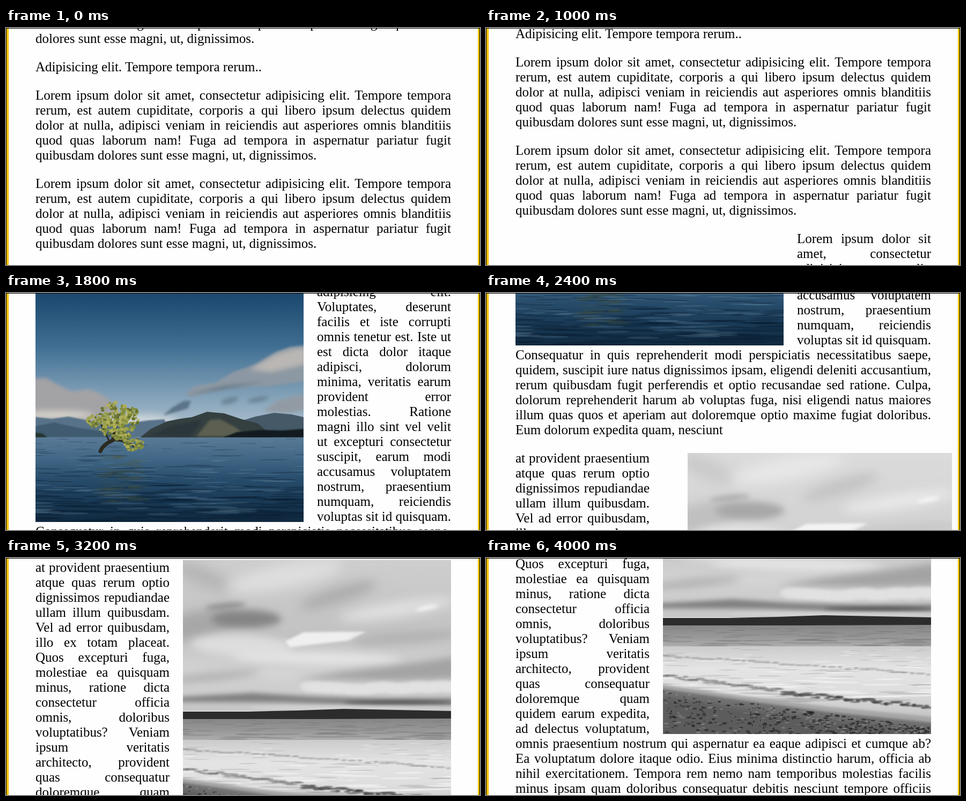
Recreate the animation shown at these times as an HTML page with a canvas. Size 884 px wide and 443 px high, loop 5700 ms.

```html
<!DOCTYPE html>
<html lang="la">
<head>
<meta charset="utf-8">
<title>Slide in on scroll</title>
<style>
  html, body { margin: 0; width: 100%; height: 100%; overflow: hidden; background: #fefefe; }
  #stage { position: relative; width: 884px; height: 443px; overflow: hidden; background: #fefefe; }
  #sides { position: absolute; inset: 0 -1px 0 0; border: solid #ffc400; border-width: 0 5px; box-sizing: border-box; }
  #page { position: absolute; left: 0; top: 0; width: 100%; height: 1800px; will-change: transform;
          font: 25px "Liberation Serif", "Times New Roman", Times, serif; color: #000; }
  #page > * { position: absolute; }
  .line { height: 28px; text-align: justify; text-align-last: justify; }
  .end { text-align-last: left; }
  canvas { width: 500px; height: 500px; }
  #frame { position: absolute; inset: 0; border: solid #000; border-width: 1px 1px 0; }
</style>
</head>
<body>
<div id="stage">
  <div id="sides"></div>
  <div id="page"></div>
  <div id="frame"></div>
</div>
<script>
const LOOP = 5700, STEP = 100;
const page = document.getElementById('page');

const lorem = `Lorem ipsum dolor sit amet, consectetur adipisicing elit. Tempore tempora
rerum, est autem cupiditate, corporis a qui libero ipsum delectus quidem
dolor at nulla, adipisci veniam in reiciendis aut asperiores omnis blanditiis
quod quas laborum nam! Fuga ad tempora in aspernatur pariatur fugit
quibusdam dolores sunt esse magni, ut, dignissimos.`;

// top, left, width, last line ragged, text
const blocks = [
  [-22, 55, 775, true, `laborum nam! Fuga ad tempora in aspernatur pariatur fugit quibusdam
dolores sunt esse magni, ut, dignissimos.`],
  [59, 55, 775, true, 'Adipisicing elit. Tempore tempora rerum..'],
  [112, 55, 775, true, lorem],
  [277, 55, 775, true, lorem],
  [442, 580, 250, false, `Lorem ipsum dolor sit
amet, consectetur
adipisicing elit.
Voluptates, deserunt
facilis et iste corrupti
omnis tenetur est. Iste ut
est dicta dolor itaque
adipisci, dolorum
minima, veritatis earum
provident error
molestias. Ratione
magni illo sint vel velit
ut excepturi consectetur
suscipit, earum modi
accusamus voluptatem
nostrum, praesentium
numquam, reiciendis
voluptas sit id quisquam.`],
  [946, 55, 775, true, `Consequatur in quis reprehenderit modi perspiciatis necessitatibus saepe,
quidem, suscipit iure natus dignissimos ipsam, eligendi deleniti accusantium,
rerum quibusdam fugit perferendis et optio recusandae sed ratione. Culpa,
dolorum reprehenderit harum ab voluptas fuga, nisi eligendi natus maiores
illum quas quos et aperiam aut doloremque optio maxime fugiat doloribus.
Eum dolorum expedita quam, nesciunt`],
  [1139, 55, 250, false, `at provident praesentium
atque quas rerum optio
dignissimos repudiandae
ullam illum quibusdam.
Vel ad error quibusdam,
illo ex totam placeat.
Quos excepturi fuga,
molestiae ea quisquam
minus, ratione dicta
consectetur officia
omnis, doloribus
voluptatibus? Veniam
ipsum veritatis
architecto, provident
quas consequatur
doloremque quam
quidem earum expedita,
ad delectus voluptatum,`],
  [1643, 55, 775, false, `omnis praesentium nostrum qui aspernatur ea eaque adipisci et cumque ab?
Ea voluptatum dolore itaque odio. Eius minima distinctio harum, officia ab
nihil exercitationem. Tempora rem nemo nam temporibus molestias facilis
minus ipsam quam doloribus consequatur debitis nesciunt tempore officiis`]
];

function place(el, left, top) {
  el.style.left = left + 'px';
  el.style.top = top + 'px';
  page.append(el);
  return el;
}

for (const [top, left, width, ragged, text] of blocks) {
  const box = place(document.createElement('div'), left, top);
  box.style.width = width + 'px';
  for (const words of text.split('\n')) {
    const line = document.createElement('div');
    line.className = 'line';
    line.textContent = words;
    box.append(line);
  }
  if (ragged) box.lastChild.classList.add('end');
}

// Drawing helpers
let seed = 7;
const rnd = (a, b) => {
  seed = (seed * 16807) % 2147483647;
  return a + (b - a) * seed / 2147483647;
};

function fade(c, y0, y1, ...colors) {
  const g = c.createLinearGradient(0, y0, 0, y1);
  colors.forEach((col, i) => g.addColorStop(i / (colors.length - 1), col));
  c.fillStyle = g;
  c.fillRect(0, y0, 500, y1 - y0);
}

function poly(c, color, blur, ...pts) {
  c.filter = blur ? `blur(${blur}px)` : 'none';
  c.fillStyle = color;
  c.beginPath();
  for (let i = 0; i < pts.length; i += 2) c.lineTo(pts[i], pts[i + 1]);
  c.fill();
  c.filter = 'none';
}

function puff(c, color, blur, x, y, rx, ry, turn = 0) {
  c.filter = blur ? `blur(${blur}px)` : 'none';
  c.fillStyle = color;
  c.beginPath();
  c.ellipse(x, y, rx, ry, turn, 0, 7);
  c.fill();
  c.filter = 'none';
}

// Flat ripples, larger towards the bottom
function ripples(c, n, y0, y1, color, len) {
  for (let i = 0; i < n; i++) {
    const k = rnd(0, 1);
    puff(c, color, 0, rnd(-20, 520), y0 + k * (y1 - y0), len * (0.3 + k) * rnd(0.5, 1), 0.5 + k * 1.6, rnd(-0.03, 0.03));
  }
}

function lake(c) {
  fade(c, 0, 342, '#173a5a', '#1f4c72', '#3f6e92', '#7d9db5', '#b9c9d3');
  poly(c, '#a3a2a5', 3, -8, 232, 20, 231, 42, 244, 68, 256, 100, 252, 125, 262, 150, 284, 165, 312, -8, 316);
  puff(c, '#d5d1cb', 6, 40, 300, 70, 8);
  puff(c, '#cfd6da', 7, 195, 312, 70, 12);
  poly(c, '#8c98a3', 2, 280, 262, 296, 246, 335, 240, 368, 220, 412, 205, 450, 182, 475, 173, 505, 170, 505, 236, 440, 246, 360, 250, 290, 266);
  poly(c, '#b9b6b3', 4, 400, 215, 445, 188, 480, 177, 505, 175, 505, 205, 440, 220);
  poly(c, '#647987', 3, 284, 262, 350, 246, 430, 238, 350, 252);
  poly(c, '#5c7487', 2, 238, 301, 255, 286, 276, 274, 290, 273, 284, 288);
  poly(c, '#929ba3', 3, 425, 293, 450, 274, 478, 266, 505, 262, 505, 290, 470, 296);
  puff(c, '#6d8799', 3, 362, 273, 17, 6, -0.3);
  puff(c, '#6d8799', 3, 415, 271, 20, 5, -0.2);

  poly(c, '#587389', 1, 0, 304, 30, 307, 62, 303, 92, 309, 120, 317, 170, 316, 210, 310, 240, 308, 260, 342, 0, 342);
  poly(c, '#405b70', 1, 0, 321, 35, 314, 80, 324, 120, 330, 150, 337, 190, 342, 0, 342);
  poly(c, '#465967', 0, 380, 312, 410, 303, 445, 296, 478, 299, 500, 304, 500, 342, 380, 342);
  poly(c, '#343f40', 0, 195, 342, 215, 326, 245, 312, 270, 307, 292, 304, 320, 294, 352, 297, 385, 308, 415, 316, 445, 342);
  poly(c, '#5d6050', 2, 300, 340, 325, 309, 345, 308, 375, 324, 392, 340);
  poly(c, '#2b363b', 2, 215, 338, 255, 320, 310, 310, 288, 340);
  poly(c, '#111b20', 1, 350, 342, 376, 332, 420, 328, 460, 329, 500, 326, 500, 342);
  poly(c, '#25352e', 1, 0, 342, 0, 333, 14, 335, 22, 342);

  fade(c, 342, 500, '#597a96', '#416786', '#274c6b', '#193955', '#102a40');
  ripples(c, 150, 345, 500, 'rgba(8,27,46,.32)', 55);
  ripples(c, 100, 345, 488, 'rgba(120,155,182,.2)', 38);

  for (let i = 0; i < 46; i++) {
    const y = rnd(373, 462);
    puff(c, 'rgba(82,88,52,.24)', 1, rnd(125, 195), y, rnd(8, 25), 1.8);
  }
  c.strokeStyle = '#2c2a20';
  c.lineCap = 'round';
  for (const [w, ...p] of [
    [7, 121, 368, 126, 355, 143, 348],
    [5, 143, 348, 150, 325, 154, 300],
    [4, 143, 347, 170, 346, 188, 362],
    [3, 138, 349, 127, 330, 120, 310]
  ]) {
    c.lineWidth = w;
    c.beginPath();
    c.moveTo(p[0], p[1]);
    c.quadraticCurveTo(p[2], p[3], p[4], p[5]);
    c.stroke();
  }
  const leaves = ['#66712f', '#838d3c', '#9da24b', '#b0ae59'];
  for (const [x, y, rx, ry] of [[146, 298, 29, 22], [170, 312, 22, 19], [118, 312, 21, 13], [145, 324, 25, 16], [182, 293, 11, 9], [184, 355, 18, 11], [162, 340, 15, 9]]) {
    for (let i = 0; i < rx * 2.6; i++) {
      const a = rnd(0, 6.28), r = Math.sqrt(rnd(0, 1));
      puff(c, leaves[Math.floor(rnd(0, 4))], 0, x + Math.cos(a) * r * rx, y + Math.sin(a) * r * ry, rnd(1.5, 4), rnd(1.5, 3.5));
    }
  }
}

function shore(c) {
  fade(c, 0, 282, '#cecece', '#c8c8c8', '#c2c2c2', '#d4d4d4', '#c6c6c6');
  puff(c, '#b5b5b5', 12, 35, 30, 60, 18, 0.4);
  puff(c, '#dedede', 12, 190, 30, 110, 22, -0.2);
  puff(c, '#acacac', 10, 290, 65, 75, 14, -0.3);
  puff(c, '#a7a7a7', 10, 30, 120, 75, 25, -0.2);
  puff(c, '#858585', 7, 118, 110, 65, 17);
  puff(c, '#929292', 5, 80, 86, 38, 6, -0.1);
  puff(c, '#e0e0e0', 10, 400, 92, 110, 14, -0.15);
  puff(c, '#f2f2f2', 3, 455, 89, 22, 4, -0.2);
  puff(c, '#dddddd', 8, 110, 160, 95, 20, 0.05);
  poly(c, '#efefef', 2, 190, 152, 225, 135, 290, 134, 342, 134, 310, 150, 250, 157, 200, 163);
  puff(c, '#b4b4b4', 7, 415, 145, 100, 11, -0.08);
  puff(c, '#e5e5e5', 8, 250, 183, 160, 11, 0.02);
  poly(c, '#a3a3a3', 7, 210, 222, 300, 208, 400, 196, 510, 180, 510, 222, 390, 226);
  puff(c, '#b0b0b0', 8, 55, 218, 90, 8, -0.1);
  for (let i = 0; i < 14; i++) puff(c, '#e1e1e1', 3, 240 + i * 20, 239 + rnd(-4, 4), 22, 10);
  puff(c, '#cdcdcd', 6, 100, 241, 120, 8);
  poly(c, '#808080', 4, -8, 256, 130, 248, 240, 255, 370, 259, 510, 258, 510, 272, 360, 272, 190, 266, -8, 265);
  puff(c, '#5e5e5e', 3, 400, 266, 100, 4);
  puff(c, '#dadada', 3, 330, 276, 210, 3);

  fade(c, 291, 345, '#818181', '#979797', '#b8b8b8');
  ripples(c, 90, 300, 345, 'rgba(85,85,85,.2)', 50);
  poly(c, '#2c2c2c', 0, 0, 283, 120, 283, 215, 281, 300, 278, 400, 280, 500, 282, 500, 296, 250, 297, 0, 297);

  fade(c, 336, 500, '#cbcbcb', '#e4e4e4', '#dedede', '#c9c9c9', '#bcbcbc');
  ripples(c, 70, 338, 440, 'rgba(130,130,130,.22)', 45);
  ripples(c, 50, 342, 435, 'rgba(250,250,250,.5)', 50);
  for (let i = 0; i < 34; i++) puff(c, 'rgba(105,105,105,.55)', 1, i * 15, 354 + i + rnd(-2, 2), rnd(4, 13), 1.2);
  for (let i = 0; i < 36; i++) puff(c, 'rgba(80,80,80,.5)', 1, i * 7, 390 + i * 0.9 + rnd(-3, 3), rnd(4, 13), 1.6);
  for (let i = 0; i < 48; i++) puff(c, i % 3 ? '#646464' : '#444444', 1, 225 + i * 5.8, 423 + i * 0.57 + rnd(-4, 4), rnd(4, 13), rnd(1, 3));

  poly(c, '#a6a6a6', 2, -5, 407, 150, 429, 310, 449, 505, 468, 505, 505, -5, 505);
  poly(c, '#727272', 2, -5, 415, 150, 437, 310, 459, 505, 479, 505, 505, -5, 505);
  poly(c, '#5c5c5c', 6, -5, 428, 130, 449, 300, 472, 505, 492, 505, 510, -5, 510);
  for (let i = 0; i < 520; i++) {
    const x = rnd(0, 500), top = 420 + x * 0.135;
    puff(c, i % 4 ? 'rgba(30,30,30,.6)' : 'rgba(150,150,150,.5)', 0, x, rnd(top, 502), rnd(1, 5), rnd(0.6, 2));
  }
}

// Photos slide in sideways, driven by the shared clock
function photo(draw, left, top, shift, start) {
  const el = place(document.createElement('canvas'), left, top);
  el.width = el.height = 500;
  draw(el.getContext('2d'));
  const move = el.animate([
    { opacity: 0, transform: `translateX(${shift}) scale(.95)` },
    { opacity: 1, transform: 'translateX(0%) scale(1)' }
  ], { delay: start, duration: 500, easing: 'ease', fill: 'both' });
  move.pause();
  return move;
}

const slides = [
  photo(lake, 55, 442, '-30%', 1040),
  photo(shore, 330, 1139, '30%', 2187)
];

// time, scroll offset, speed in px per step
const keys = [
  [500, 0, 0], [1000, 62, 30], [1800, 514, 56], [2400, 844, 56],
  [2800, 1069, 30], [3600, 1180, 20], [4000, 1310, 0]
];

function scrollAt(t) {
  if (t <= keys[0][0]) return 0;
  const i = keys.findIndex(k => t < k[0]);
  if (i < 0) return keys[keys.length - 1][1];
  const [t0, y0, v0] = keys[i - 1], [t1, y1, v1] = keys[i];
  const u = (t - t0) / (t1 - t0), n = (t1 - t0) / STEP;
  const ease = u * u * (3 - 2 * u);
  return y0 + (y1 - y0) * ease + n * u * (1 - u) * (v0 * (1 - u) - v1 * u);
}

const began = performance.now();

function tick() {
  const now = (performance.now() - began) % LOOP;
  const t = Math.floor(now / STEP) * STEP;
  page.style.transform = `translateY(${-Math.round(scrollAt(t))}px)`;
  for (const s of slides) s.currentTime = t;
  requestAnimationFrame(tick);
}
tick();
</script>
</body>
</html>
```
